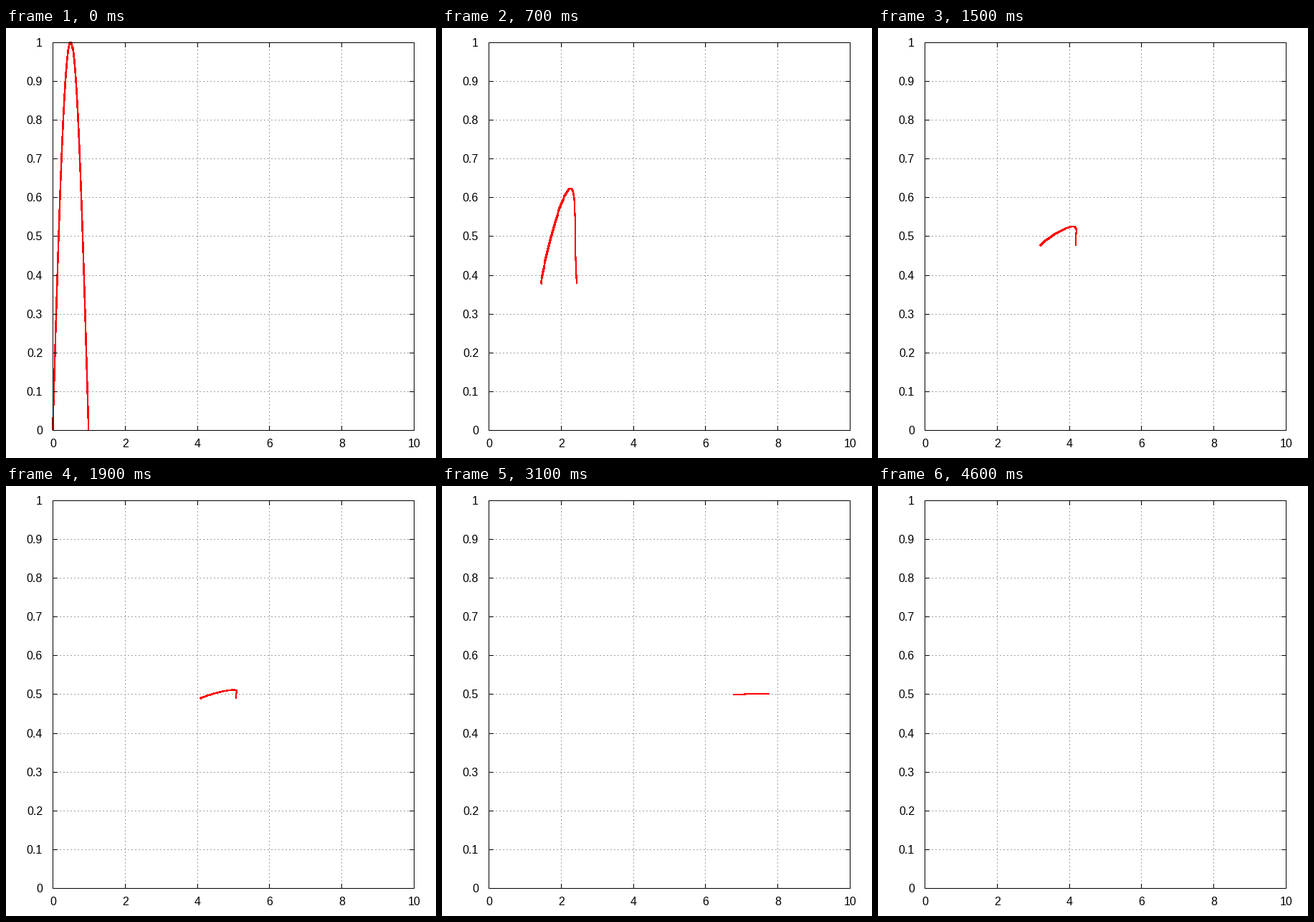
Write a matplotlib script that moves like this. It is 600 px wide and 600 px high and loops after 5 s.

```python
import numpy as np
import matplotlib.pyplot as plt
from matplotlib.animation import FuncAnimation
from matplotlib.patches import Rectangle

SIZE, DPI = 600, 100
PX = 72 / DPI                      # one pixel in points
LEFT, RIGHT, TOP, BOTTOM = 65, 569, 20, 561
TICK = 6
FRAMES, INTERVAL = 50, 100

plt.rcParams["font.family"] = "Liberation Sans"
plt.rcParams["path.simplify"] = False

fig = plt.figure(figsize=(SIZE / DPI, SIZE / DPI), dpi=DPI, facecolor="white")
ax = fig.add_axes([0, 0, 1, 1])
ax.set_xlim(0, SIZE)
ax.set_ylim(SIZE, 0)
ax.axis("off")


def px(x):
    return np.rint(LEFT + (RIGHT - LEFT) * x / 10)


def py(y):
    return np.rint(BOTTOM - (BOTTOM - TOP) * y)


def hline(x0, x1, y, **style):
    """Horizontal pixel run covering columns x0..x1."""
    ax.plot([x0, x1 + 1], [y + 0.5] * 2, lw=PX, snap=False,
            solid_capstyle="butt", dash_capstyle="butt", **style)


def vline(x, y0, y1, **style):
    """Vertical pixel run covering rows y0..y1."""
    ax.plot([x + 0.5] * 2, [y0, y1 + 1], lw=PX, snap=False,
            solid_capstyle="butt", dash_capstyle="butt", **style)


def label(x, y, value, align):
    ax.text(x, y, f"{value:g}", size=16 * PX, ha=align, va="baseline")


grid = dict(color="#a0a0a0", ls=(0, (2, 3)), zorder=1)
ink = dict(color="black", zorder=3)

for i in range(11):
    y = py(i / 10)
    if 0 < i < 10:
        hline(LEFT, RIGHT, y, **grid)
        hline(LEFT, LEFT + TICK, y, **ink)
        hline(RIGHT - TICK, RIGHT, y, **ink)
    label(51, y + 6, i / 10, "right")

for value in range(0, 11, 2):
    x = px(value)
    if 0 < value < 10:
        vline(x, TOP, BOTTOM, **grid)
        vline(x, TOP, TOP + TICK, **ink)
        vline(x, BOTTOM - TICK, BOTTOM, **ink)
    label(x + 0.5, 585, value, "center")

for y in (TOP, BOTTOM):
    hline(LEFT, RIGHT, y, **ink)
for x in (LEFT, RIGHT):
    vline(x, TOP, BOTTOM, **ink)

wave, = ax.plot([], [], color="#ff0000", lw=2 * PX, antialiased=False,
                snap=False, solid_capstyle="butt", solid_joinstyle="bevel",
                zorder=2)
wave.set_clip_path(Rectangle((0, 0), RIGHT, SIZE, transform=ax.transData))

x0 = np.linspace(0, 1, 100)
u0 = np.sin(np.pi * x0)
MID = (np.arange(200) + 0.5) / 200


def height(s):
    """Each point relaxes exponentially towards 0.5."""
    return 0.5 + (u0 - 0.5) * np.exp(-s)


def update(n):
    s = 0.2 * n
    # points travel at speed sqrt(1 + u^2), integrated by the midpoint rule
    speed = np.sqrt(1 + height(s * MID[:, None]) ** 2)
    wave.set_data(px(x0 + s * speed.mean(axis=0)), py(height(s)))
    return wave,


anim = FuncAnimation(fig, update, frames=FRAMES, interval=INTERVAL,
                     repeat=True, repeat_delay=0, blit=False)
plt.show()
```
